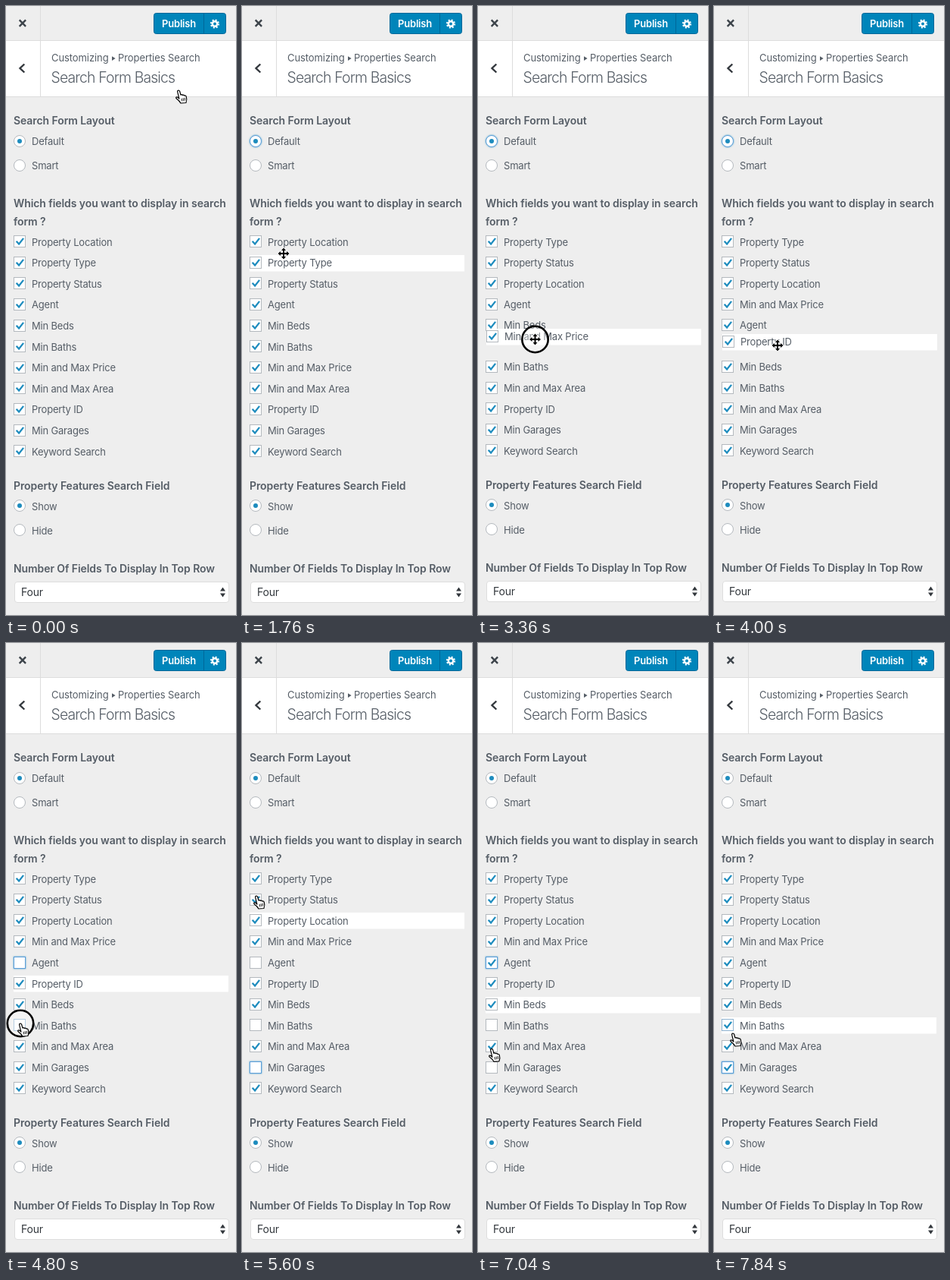
These frames come from a looping animation (304 px wide and 802 px high, 8000 ms). An HTML page:

```html
<!DOCTYPE html>
<html lang="en">
<head>
<meta charset="utf-8">
<title>Search form settings</title>
<style>
  html, body { margin: 0; width: 100%; height: 100%; overflow: hidden; background: #eee; }
  svg { display: block; width: 100vw; height: 100vh; }
  text { font: 400 13px Inter, Roboto, sans-serif; letter-spacing: -.19px; fill: #555d66; white-space: pre; }
  .crumb { letter-spacing: -.08px; }
  .heading { font-size: 14px; font-weight: 600; letter-spacing: -.08px; }
  .title { font-size: 19.4px; font-weight: 300; letter-spacing: -.85px; }
  .control { fill: #fff; stroke: #b4b9be; }
  .focus { stroke: #5b9dd9; filter: drop-shadow(0 0 1px rgba(30, 140, 190, .8)); }
  .fading { stroke: #8fb3d0; }
  .dot { fill: #1e8cbe; }
  .tick { fill: none; stroke: #1e8cbe; stroke-width: 2.3; }
  .hand { fill: #fff; stroke: #000; stroke-width: 1.2; stroke-linejoin: round; }
</style>
</head>
<body>
<svg viewBox="0 0 304 802">
  <rect width="304" height="802" fill="#eee"/>
  <rect y="46" width="304" height="73" fill="#fff"/>
  <path d="M0 45.5H304M0 119.5H304M45.5 0V119" stroke="#ddd" fill="none"/>
  <path d="M17.7 18.4l8.4 8.4m0-8.4l-8.4 8.4" stroke="#3c434a" stroke-width="2.4"/>
  <path d="M24.3 76.5l-5.8 5.5 5.8 5.5" fill="none" stroke="#32373c" stroke-width="2.4"/>

  <rect x="195.5" y="9.5" width="95" height="27" rx="3" fill="#0085ba" stroke="#006799"/>
  <path d="M261.5 10v26" stroke="#006799"/>
  <text x="206" y="28" style="fill:#fff;font-weight:600">Publish</text>
  <g fill="none" stroke="#fff" transform="translate(276 23.5)">
    <circle r="3.2" stroke-width="2.5"/>
    <circle r="5.1" stroke-width="2" stroke-dasharray="2 2.005"/>
  </g>

  <text class="crumb" x="60" y="73">Customizing</text>
  <path d="M140 66.2l4.6 2.9-4.6 2.9z" fill="#555d66"/>
  <text class="crumb" x="148" y="73">Properties Search</text>
  <text class="title" x="59.5" y="101">Search Form Basics</text>

  <text class="heading" x="10" y="156">Search Form Layout</text>
  <circle class="control" id="layoutRadio" cx="18" cy="178" r="7.5"/>
  <circle class="dot" cx="18" cy="178" r="3"/>
  <text x="34" y="183">Default</text>
  <circle class="control" cx="18" cy="210" r="7.5"/>
  <text x="34" y="215">Smart</text>
  <text class="heading" x="10" y="265">Which fields you want to display in search</text>
  <text class="heading" x="10" y="289">form ?</text>

  <g id="footer">
    <text class="heading" x="10" y="637">Property Features Search Field</text>
    <circle class="control" cx="18" cy="658" r="7.5"/>
    <circle class="dot" cx="18" cy="658" r="3"/>
    <text x="34" y="664">Show</text>
    <circle class="control" cx="18" cy="690" r="7.5"/>
    <text x="34" y="696">Hide</text>
    <text class="heading" x="10" y="746">Number Of Fields To Display In Top Row</text>
    <rect x="11.5" y="758.5" width="283" height="27" rx="3.5" fill="#fff" stroke="#ddd"/>
    <text x="20" y="777" style="font-size:14px;fill:#32373c">Four</text>
    <path d="M283 770.5l3.5-5 3.5 5zM283 773.5l3.5 5 3.5-5z" fill="#32373c"/>
  </g>

  <g id="rows"></g>

  <g id="cursor">
    <circle id="press" r="17.2" fill="rgba(255,255,255,.35)" stroke="#000" stroke-width="2.6"/>
    <g id="hand" transform="translate(-4.3 -.5)">
      <path class="hand" d="M5.2 11.5L3 2.6Q2.7 .6 4.3 .5Q5.6 .5 6 2L7.2 6.5Q8.6 5.4 9.6 6.9Q11.2 6 12 7.6Q14 7 14.6 9Q15.8 13 14.2 17L7.2 17.5Q5.6 14.4 2 11.8Q.4 10.4 1.4 9.5Q2.8 8.7 5.2 11.5Z"/>
      <path class="hand" style="stroke-width:.9" d="M8.3 11.3l.8 3.6M10.4 10.8l.7 3.7M12.4 10.3l.6 3.7"/>
    </g>
    <path id="move" d="M0-7.5L3-4H1V-1H4V-3L7.5 0L4 3V1H1V4H3L0 7.5L-3 4H-1V1H-4V3L-7.5 0L-4-3V-1H-1V-4H-3Z"
      stroke="#fff" stroke-width="1.6" stroke-linejoin="round" paint-order="stroke"/>
  </g>
</svg>
<script>
const LOOP = 8000, STEP = 160;
const FIRST_ROW = 311, PITCH = 27.6;
const byId = id => document.getElementById(id);

const fields = ['Property Location', 'Property Type', 'Property Status', 'Agent', 'Min Beds', 'Min Baths',
  'Min and Max Price', 'Min and Max Area', 'Property ID', 'Min Garages', 'Keyword Search'];

// Pointer hotspot: time, x, y
const path = [
  [0, 228, 111], [160, 226, 113], [640, 66, 165], [960, 20, 178], [1120, 23, 190],
  [1440, 48, 330], [1600, 52, 335], [1760, 55, 326], [1920, 60, 319], [2240, 63, 320],
  [2400, 64, 331], [2720, 67, 378], [2880, 67, 378], [3040, 71, 462], [3200, 75, 480],
  [3520, 76, 398], [3680, 83, 536], [4000, 84, 447], [4160, 70, 440], [4480, 19, 418],
  [4800, 19, 501], [5120, 19, 556], [5280, 19, 552], [5440, 20, 366], [5600, 19, 333],
  [5760, 18, 335], [6080, 18, 335], [6240, 18, 393], [6400, 18, 413], [6560, 18, 417],
  [7200, 18, 556], [7520, 19, 504], [7680, 20, 503], [7840, 25, 514]
];

// The gap left by a lifted row nudges everything below it.
const drags = [
  { field: 'Property Location', start: 2240, end: 2880, nudge: .3 },
  { field: 'Min and Max Price', start: 3200, end: 3520, nudge: -.8 },
  { field: 'Property ID', start: 3680, end: 4000, nudge: -.8 }
];

const clicks = [
  [960, 'Default'], [4480, 'Agent'], [4800, 'Min Baths'], [5120, 'Min Garages'], [5760, 'Property Status'],
  [6080, 'Property Status'], [6560, 'Agent'], [7200, 'Min Garages'], [7840, 'Min Baths']
];

const rowY = slot => FIRST_ROW + PITCH * slot;
const slotAt = y => Math.max(0, Math.min(fields.length - 1, Math.round((y - FIRST_ROW) / PITCH)));

function pointer(time) {
  const next = path.findIndex(key => key[0] > time);
  if (next < 0) return path.at(-1).slice(1);
  if (next === 0) return path[0].slice(1);
  const [t0, x0, y0] = path[next - 1], [t1, x1, y1] = path[next];
  const p = (time - t0) / (t1 - t0), eased = p * p * (3 - 2 * p);
  return [x0 + (x1 - x0) * eased, y0 + (y1 - y0) * eased];
}

function listState(time) {
  const order = [...fields];
  let held = null;
  for (const { field, start, end, nudge } of drags) {
    if (time < start) break;
    const from = order.indexOf(field);
    const [x0, y0] = pointer(start), [x, y] = pointer(Math.min(time, end));
    const rowTop = rowY(from) + y - y0;
    order.splice(from, 1);
    order.splice(slotAt(rowTop), 0, field);
    if (time <= end) held = { field, nudge, x: x - x0, y: rowTop };
  }
  return { order, held };
}

function hoveredSlot(time) {
  const y = pointer(time)[1], slot = slotAt(y);
  return Math.abs(y - rowY(slot)) < 11.5 ? slot : -1;
}

const rows = {};
for (const field of fields) {
  const row = document.createElementNS('http://www.w3.org/2000/svg', 'g');
  row.innerHTML = `<g>
      <rect x="10" y="-10" width="284" height="21.5" fill="#fff"/>
      <rect class="control" x="10.5" y="-7.5" width="15" height="15"/>
      <path class="tick" d="M13.7-.2l3.4 3.7 6-7.6"/>
    </g>
    <text x="34" y="5">${field}</text>`;
  const [frame, label] = row.children;
  const [back, box, tick] = frame.children;
  rows[field] = { row, frame, label, back, box, tick };
  byId('rows').append(row);
}

const show = (node, visible) => { node.style.display = visible ? '' : 'none'; };
const place = (node, x, y) => node.setAttribute('transform', `translate(${x} ${y})`);

// Boxes and labels each snap to whole pixels.
function placeRow({ frame, label }, x, y) {
  place(frame, Math.round(x), Math.round(y - .75));
  place(label, Math.round(x), Math.floor(y));
}

function draw(time) {
  const { order, held } = listState(time);
  const hovered = held ? -1 : hoveredSlot(Math.max(0, time - STEP));
  const past = clicks.filter(click => click[0] <= time);
  const [clickTime, latest] = past.at(-1) || [];
  // Focus takes one step to pass from one control to the next.
  const passing = clickTime === time && past.length > 1;
  const focused = passing ? past.at(-2)[1] : latest;
  const style = (node, name) => {
    node.classList.toggle('focus', name === focused);
    node.classList.toggle('fading', passing && name === latest && name !== focused);
  };
  const nudge = held ? held.nudge : 0;

  order.forEach((field, slot) => {
    const parts = rows[field], isHeld = held && held.field === field;
    if (isHeld) placeRow(parts, held.x, held.y);
    else placeRow(parts, 0, rowY(slot) + (slot > 3 ? nudge : 0));
    show(parts.back, isHeld || slot === hovered);
    show(parts.tick, past.filter(click => click[1] === field).length % 2 === 0);
    style(parts.box, field);
  });
  if (held && byId('rows').lastChild !== rows[held.field].row) byId('rows').append(rows[held.field].row);
  style(byId('layoutRadio'), 'Default');
  place(byId('footer'), 0, Math.round(nudge));

  const moving = time >= 1440 && time <= 4160;
  place(byId('cursor'), ...pointer(time));
  show(byId('move'), moving);
  show(byId('hand'), !moving);
  show(byId('press'), drags.some(d => time >= d.start && time < d.end) ||
    (clickTime === time && time > 4400 && time < 5200));
}

function frame() {
  const time = performance.now() % LOOP;
  draw(Math.floor(time / STEP) * STEP);
  requestAnimationFrame(frame);
}
frame();
</script>
</body>
</html>
```
